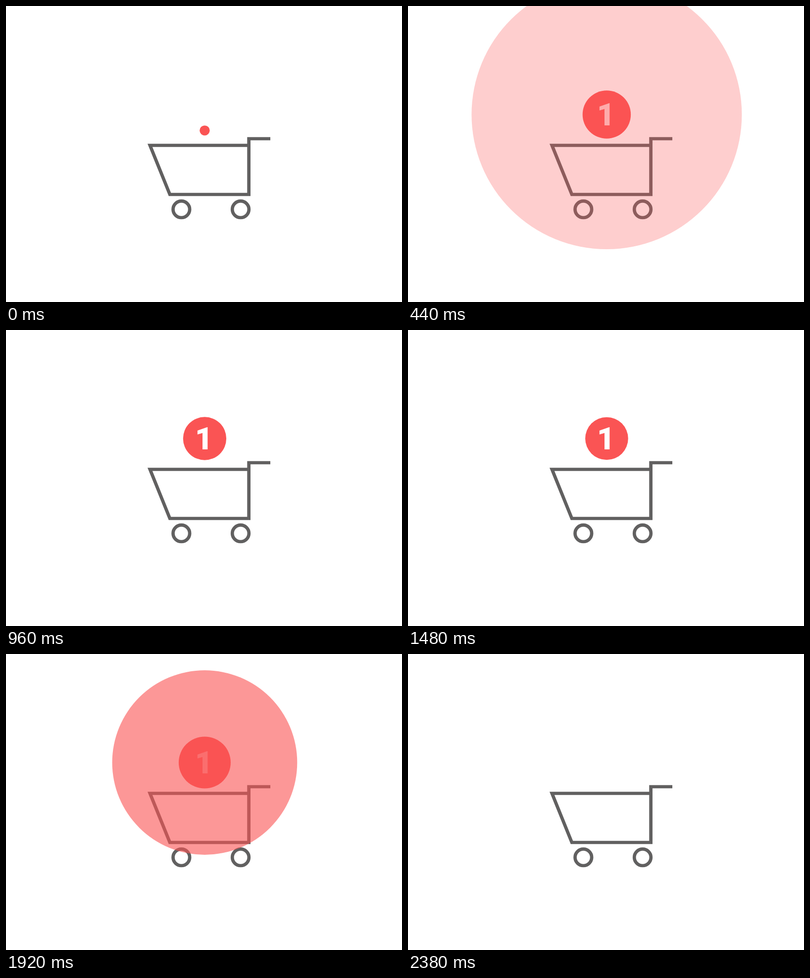
An HTML page with a canvas for the animation above (2400 ms loop, 800 by 600 pixels).

```html
<!DOCTYPE html>
<html lang="en">
<head>
<meta charset="utf-8">
<title>Cart badge</title>
<style>
  html, body { margin: 0; width: 100%; height: 100%; overflow: hidden; background: #fff; }
  canvas { display: block; width: 800px; height: 600px; }
</style>
</head>
<body>
<canvas id="stage" width="800" height="600"></canvas>
<script>
const ctx = document.getElementById('stage').getContext('2d');
const LOOP = 2400;
const RED = '#fa5454', GREY = '#616060';
const CENTER_X = 401.4, CENTER_Y = 220;
const DOT_R = 10.2, BADGE_R = 43.6, RIPPLE_R = 350;

const clamp01 = v => Math.min(1, Math.max(0, v));
const progress = (t, start, duration) => clamp01((t - start) / duration);
const sineInOut = u => (1 - Math.cos(Math.PI * u)) / 2;

function elasticOut(u, period) {
  if (u <= 0) return 0;
  if (u >= 1) return 1;
  return 1 + 2 ** (-10 * u) * Math.sin((u - period / 4) * 2 * Math.PI / period);
}

function disc(y, r) {
  ctx.fillStyle = RED;
  ctx.beginPath();
  ctx.arc(CENTER_X, y, Math.max(0, r), 0, 2 * Math.PI);
  ctx.fill();
}

function drawCart() {
  ctx.strokeStyle = GREY;
  ctx.lineWidth = 6.7;
  ctx.lineJoin = 'miter';
  ctx.beginPath();
  ctx.moveTo(490.6, 282.5);
  ctx.lineTo(290.9, 282.5);
  ctx.lineTo(331, 382);
  ctx.lineTo(490.6, 382);
  ctx.lineTo(490.6, 269);
  ctx.lineTo(534, 269);
  ctx.stroke();
  for (const x of [354.3, 474]) {
    ctx.beginPath();
    ctx.arc(x, 412.2, 16.8, 0, 2 * Math.PI);
    ctx.stroke();
  }
}

function drawCount(alpha) {
  ctx.globalAlpha = alpha;
  ctx.fillStyle = '#fff';
  ctx.font = '900 62.5px Roboto, sans-serif';
  const box = ctx.measureText('1');
  const x = 397.2 - (box.actualBoundingBoxRight - box.actualBoundingBoxLeft) / 2;
  ctx.fillText('1', x, 242.4);
  ctx.globalAlpha = 1;
}

function dotY(t) {
  if (t < 1200) return CENTER_Y + 47.5 * (1 - progress(t, -20, 120)) ** 2;
  return CENTER_Y + 50 * progress(t, 2200, 160) ** 2;
}

function badgeRadius(t) {
  const grown = t < 1300
    ? elasticOut(progress(t, 225, 900), 0.6)
    : elasticOut(progress(2080 - t, 0, 850), 0.35);
  return DOT_R + (BADGE_R - DOT_R) * grown;
}

function draw(t) {
  ctx.clearRect(0, 0, 800, 600);
  drawCart();
  if (t >= 2370) return;

  disc(dotY(t), badgeRadius(t));

  // The ripple closes as the mirror image of how it opens.
  const rippleTime = Math.min(t, 2300 - t);
  const ripple = RIPPLE_R * sineInOut(progress(rippleTime, 186, 370));
  const fade = sineInOut(progress(rippleTime, 251, 295));
  if (fade > 0) drawCount(fade);
  if (ripple > 0 && fade < 1) {
    ctx.globalAlpha = 1 - fade;
    disc(CENTER_Y, ripple);
    ctx.globalAlpha = 1;
  }
}

const startTime = performance.now();
function frame() {
  draw((performance.now() - startTime) % LOOP);
  requestAnimationFrame(frame);
}
draw(0);
requestAnimationFrame(frame);
</script>
</body>
</html>
```
